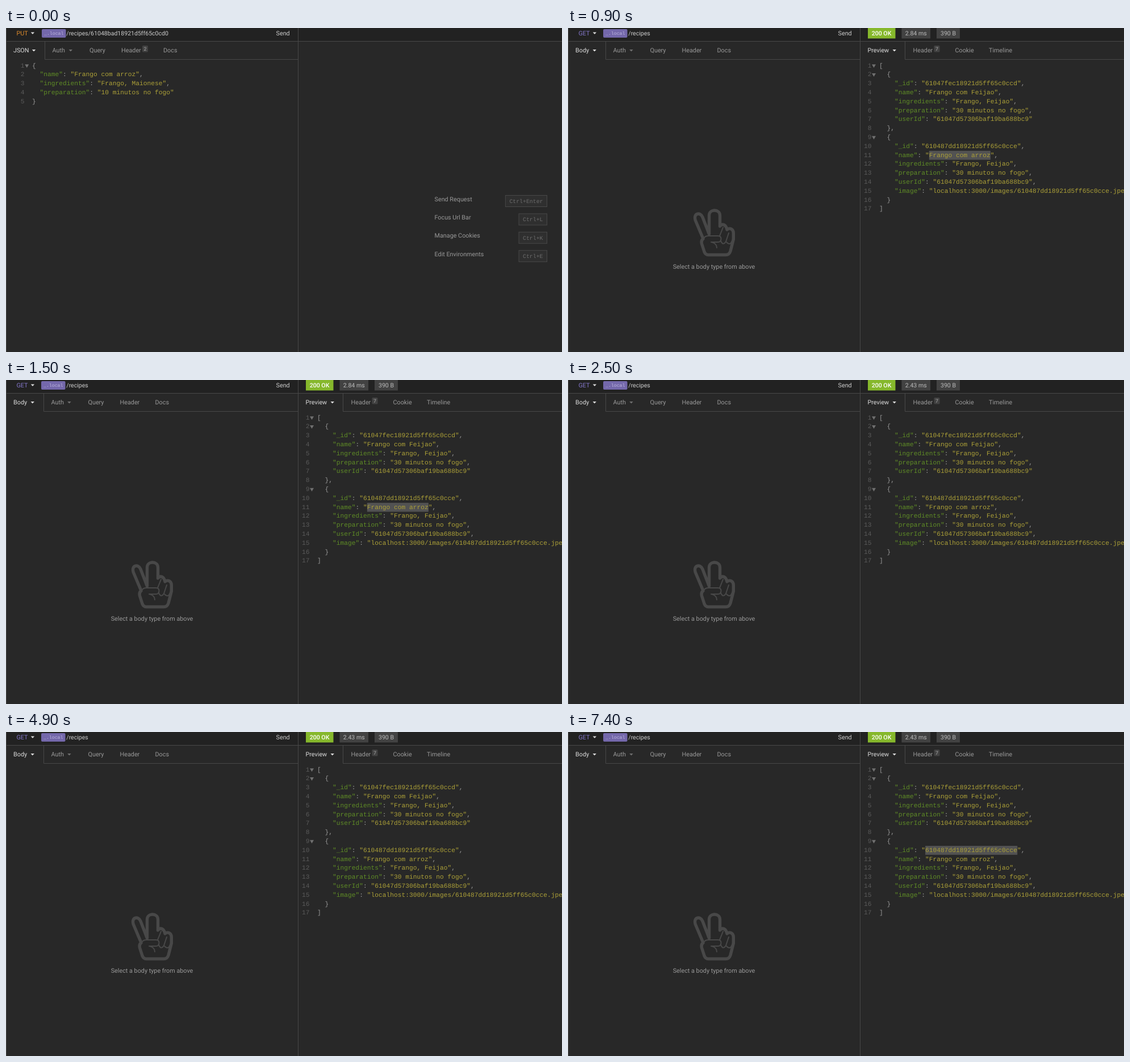
Recreate the animation shown at these times as an HTML page. Size 979 px wide and 572 px high, loop 8000 ms.

```html
<!DOCTYPE html>
<html lang="en">
<head>
<meta charset="utf-8">
<title>Recipe requests</title>
<style>
  html, body { margin: 0; width: 100%; height: 100%; overflow: hidden; background: #282828; }
  svg { display: block; }
  text { font: 10.8px Roboto, sans-serif; fill: #999; text-rendering: geometricPrecision; }
  .code { font: 11.26px "Liberation Mono", monospace; fill: #989898; }
  .number { font: 11.26px "Liberation Mono", monospace; fill: #5a5a5a; text-anchor: end; }
  .key { fill: #5f8c26; }
  .string { fill: #aca038; }
  .key-cap { font: 9.85px "Liberation Mono", monospace; fill: #6c6c6c; }
  .variable { font: 8.2px "Liberation Mono", monospace; fill: #bdb6de; }
  .badge { font-size: 8.8px; text-anchor: middle; fill: #aaa; }
  .url { font-size: 10.55px; fill: #ccc; }
</style>
</head>
<body>
<svg id="stage" width="979" height="572" viewBox="0 0 979 572"></svg>
<script>
const LOOP = 8000;
const CHAR = 6.757;
const ROW = 15.81;
const LINE = '#484848';
const BRIGHT = '#dcdcdc';

const text = (x, y, content, attrs = '') => `<text x="${x}" y="${y}" ${attrs}>${content}</text>`;
const rect = (x, y, w, h, fill, attrs = '') =>
  `<rect x="${x}" y="${y}" width="${w}" height="${h}" fill="${fill}" ${attrs}/>`;
const path = (d, attrs) => `<path d="${d}" ${attrs}/>`;
const rules = d => path(d, `stroke="${LINE}" fill="none"`);
const caret = (x, y, fill) => path(`M${x} ${y}h6.4l-3.2 3.4z`, `fill="${fill}"`);
const fold = (x, row) => path(`M${x} ${64.2 + row * ROW}h7l-3.5 6z`, 'fill="#707070"');
const during = (from, to, content) => `<g data-from="${from}" data-to="${to}">${content}</g>`;

function tab(x, label, { fill = '#999', caretX, count, countX } = {}) {
  let out = text(x, 43, label, `style="fill:${fill}"`);
  if (caretX) out += caret(caretX, 38, fill === BRIGHT ? BRIGHT : '#707070');
  if (count) out += rect(countX, 31, 10, 11.5, '#424242', 'rx="1.5"') + text(countX + 5, 40, count, 'class="badge"');
  return out;
}

function urlBar(method, color, pillX, url) {
  return text(18.5, 13, method, `style="fill:${color}"`) + caret(43.7, 7.6, BRIGHT) +
    rect(pillX, 2, 42.5, 15, '#7468ab', 'rx="2"') +
    text(pillX + 4, 12.3, '_.local', 'class="variable"') +
    text(106.3, 12.6, url, 'class="url"');
}

// Each row is [indent, source]; strings followed by a colon are keys.
function editor(rows, codeX, numberX) {
  return rows.map(([indent, source], i) => {
    const y = 69.5 + i * ROW;
    const colored = source.replace(/"[^"]*"(?=(:?))/g, (token, colon) =>
      `<tspan class='${colon ? 'key' : 'string'}'>${token}</tspan>`);
    return text(numberX, y, i + 1, 'class="number"') +
      text(codeX + indent * CHAR, y, colored, 'class="code"');
  }).join('');
}

const selection = (row, column, length) =>
  rect(548 + column * CHAR, 58.7 + row * ROW, length * CHAR, ROW, '#525252');

function shortcut(label, keys, i) {
  const y = 295.5 + i * 32.4;
  const width = keys.length * 5.91 + 14;
  return text(754.5, y + 10, label) +
    rect(952.5 - width, y, width, 20, '#2f2f2f', `stroke="${LINE}"`) +
    text(959.5 - width, y + 13.3, keys, 'class="key-cap"');
}

const recipe = (id, name, image) => [
  [2, '{'],
  [4, `"_id": "${id}",`],
  [4, `"name": "${name}",`],
  [4, '"ingredients": "Frango, Feijao",'],
  [4, '"preparation": "30 minutos no fogo",'],
  [4, `"userId": "61047d57306baf19ba688bc9"${image ? ',' : ''}`],
  ...(image ? [[4, `"image": "localhost:3000/images/${id}.jpeg"`], [2, '}']] : [[2, '},']]),
];

const hand =
  path('M238 372L224.5 340C220 327 233 324 237 334L248.5 364V331C248.5 319 267.5 319 267.5 331V350' +
    'C271 345 278 346 280 356C285 352 291.3 355 291.3 362V373L286 394Q284 400.5 278 400.5H247' +
    'Q242 400.5 240 395L235.5 381Q234 375 238 372Z',
    'fill="none" stroke="#484848" stroke-width="5.4" stroke-linejoin="round"') +
  path('M239 371Q242 367 247 367H264Q269.5 367 269.5 372Q269.5 378 264 378H252M252 378Q262 380 262 388' +
    'M267 367L273 352M269 376Q273 385 278 377L283 362M279 378Q285 385 289 376',
    'fill="none" stroke="#484848" stroke-width="2" stroke-linecap="round"');

const putView =
  urlBar('PUT', '#dc8a2c', 63, '/recipes/61048bad18921d5ff65c0cd0') +
  rules('M68.5 24V55.5H514') +
  tab(13, 'JSON', { fill: BRIGHT, caretX: 45.8 }) + tab(81.5, 'Auth', { caretX: 110.6 }) +
  tab(147, 'Query') + tab(203, 'Header', { count: 2, countX: 240 }) + tab(277, 'Docs') +
  editor([
    [0, '{'],
    [2, '"name": "Frango com arroz",'],
    [2, '"ingredients": "Frango, Maionese",'],
    [2, '"preparation": "10 minutos no fogo"'],
    [0, '}'],
  ], 46, 32.5) + fold(33.2, 0) +
  [['Send Request', 'Ctrl+Enter'], ['Focus Url Bar', 'Ctrl+L'],
   ['Manage Cookies', 'Ctrl+K'], ['Edit Environments', 'Ctrl+E']]
    .map(([label, keys], i) => shortcut(label, keys, i)).join('');

const timing = value => text(612.7, 13, value, 'style="font-size:10.6px;fill:#bbb" text-anchor="middle"');

const getView =
  urlBar('GET', '#8578cc', 62, '/recipes') +
  rules('M66.5 24V55.5H514M593.5 24V55.5H979') +
  tab(13, 'Body', { fill: BRIGHT, caretX: 43.5 }) + tab(79.5, 'Auth', { caretX: 108.2 }) +
  tab(144.5, 'Query') + tab(200.5, 'Header') + tab(262.5, 'Docs') +
  hand + text(257, 425, 'Select a body type from above', 'text-anchor="middle"') +
  rect(528, -2, 48.5, 20.5, '#86b82c') +
  text(552, 13, '200 OK', 'style="font-size:10.6px;font-weight:500;fill:#fff" text-anchor="middle"') +
  rect(587.5, -2, 50.5, 20.5, '#424242') + rect(649, -2, 41, 20.5, '#424242') +
  text(669.5, 13, '390 B', 'style="font-size:10.6px;fill:#bbb" text-anchor="middle"') +
  during(500, 1900, timing('2.84 ms') + selection(10, 13, 16)) +
  during(1900, LOOP, timing('2.43 ms')) +
  during(6500, LOOP, selection(9, 12, 24)) +
  tab(527.5, 'Preview', { fill: BRIGHT, caretX: 571.5 }) +
  tab(607.5, 'Header', { count: 7, countX: 644.5 }) + tab(681.5, 'Cookie') + tab(741, 'Timeline') +
  editor([
    [0, '['],
    ...recipe('61047fec18921d5ff65c0ccd', 'Frango com Feijao', false),
    ...recipe('610487dd18921d5ff65c0cce', 'Frango com arroz', true),
    [0, ']'],
  ], 548, 534.5) +
  during(900, LOOP, fold(535, 0)) +
  [[900, 1900], [2500, LOOP]].map(([from, to]) => during(from, to, fold(535, 1) + fold(535, 8))).join('');

const stage = document.getElementById('stage');
stage.innerHTML =
  rect(0, 0, 979, 572, '#282828') + rect(0, 0, 979, 23, '#222') +
  during(1900, 2500, rect(461, 0, 53, 23, '#262626')) +
  rules('M0 23.5H979M.5 0V572M514.5 0V572') +
  text(475.5, 13, 'Send', 'style="fill:#ccc"') +
  during(0, 500, putView) + during(500, LOOP, getView);

const timed = [...stage.querySelectorAll('[data-from]')];
const start = performance.now();

function draw() {
  const time = (performance.now() - start) % LOOP;
  for (const part of timed) {
    const shown = time >= part.dataset.from && time < part.dataset.to;
    part.style.display = shown ? '' : 'none';
  }
  requestAnimationFrame(draw);
}
draw();
</script>
</body>
</html>
```
